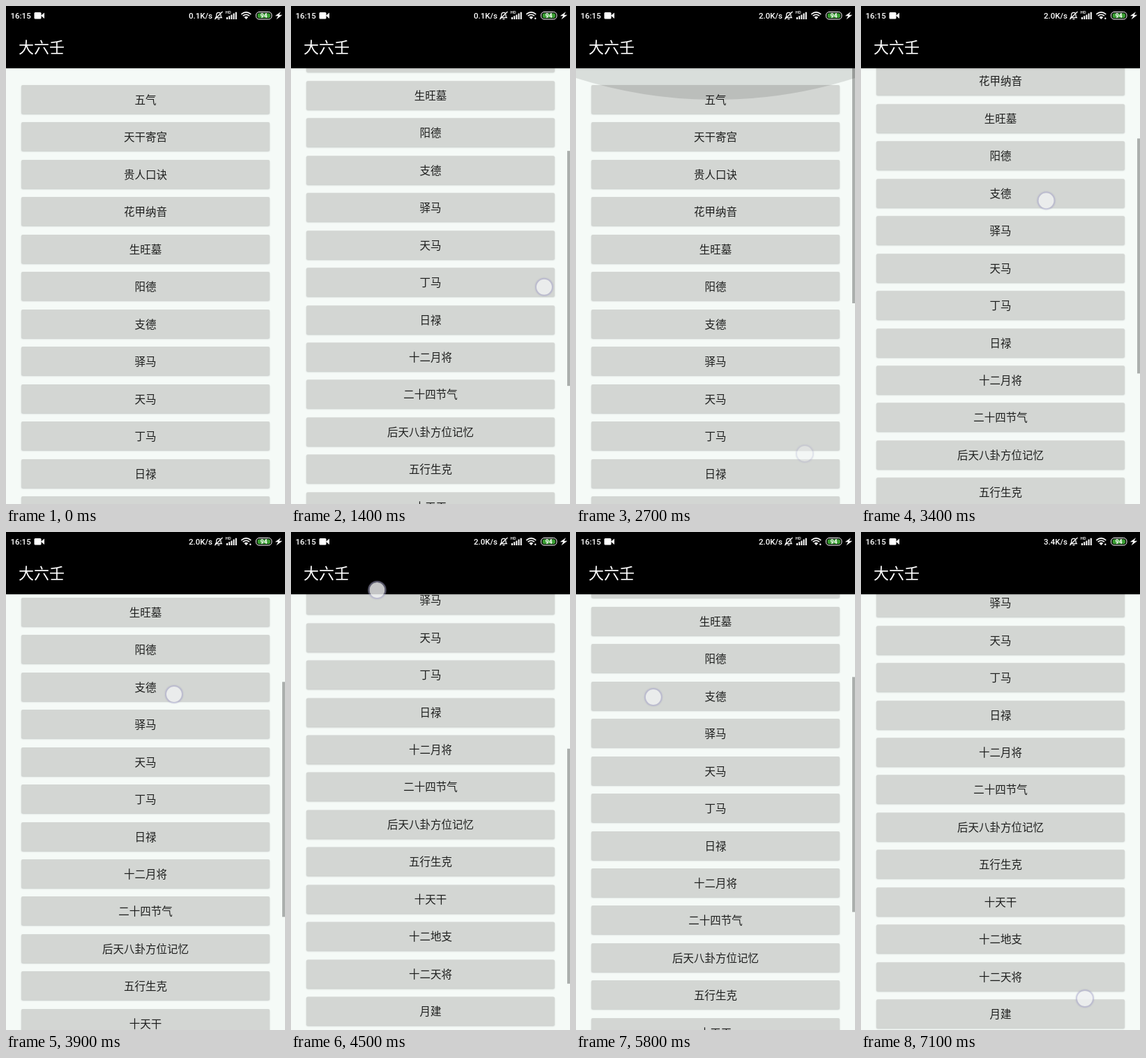
An HTML page for the animation above (7200 ms loop, 400 by 712 pixels).

```html
<!DOCTYPE html>
<html lang="zh-CN">
<head>
<meta charset="utf-8">
<style>
  html, body { margin: 0; width: 100%; height: 100%; overflow: hidden; background: #f5faf7; }
  #stage { position: relative; width: 400px; height: 712px; overflow: hidden; background: #f5faf7;
    font-family: "Noto Sans CJK SC", "Noto Sans CJK", sans-serif; }
  header { position: absolute; left: 0; top: 0; width: 400px; height: 89px; background: #000;
    box-shadow: 0 1px 2px rgba(0,0,0,.15); }
  header svg { position: absolute; left: 0; top: 0; }
  h1 { position: absolute; left: 18px; top: 41px; margin: 0; color: #fff; font: inherit;
    font-size: 22px; line-height: 32px; }
  #view { position: absolute; left: 0; top: 89px; width: 400px; height: 623px; overflow: hidden; }
  #list { position: absolute; left: 0; top: 0; width: 400px; }
  .item { position: absolute; left: 22px; width: 356px; height: 41px; border-radius: 2px;
    background: #d3d6d3; box-shadow: 0 1px 2px rgba(0,0,0,.2); color: #1e1f1e;
    font-size: 15.5px; line-height: 40px; text-align: center; }
  .glow { position: absolute; left: 0; width: 400px; height: 45px; }
  #glowTop { top: 0; transform-origin: 0 0; }
  #glowEnd { bottom: 0; transform-origin: 0 100%; }
  #bar { position: absolute; right: 0; top: 0; width: 4.5px; height: 335.5px; background: rgba(0,0,0,.3); }
  #touch { position: absolute; left: -13px; top: -13px; width: 22px; height: 22px; border-radius: 50%;
    border: 2px solid rgba(170,168,205,.55); background: rgba(240,241,242,.82);
    background-clip: padding-box; box-shadow: 0 0 2px rgba(150,150,170,.4); }
</style>
</head>
<body>
<div id="stage">
  <div id="view">
    <div id="list"></div>
    <svg class="glow" id="glowTop"><path d="M0 0H400V14A660 660 0 0 1 0 14Z" fill-opacity=".115"/></svg>
    <svg class="glow" id="glowEnd"><path d="M0 45H400V31A660 660 0 0 0 0 31Z" fill-opacity=".115"/></svg>
    <div id="bar"></div>
  </div>
  <header>
    <svg width="400" height="30" fill="#fff" font-family="Roboto, sans-serif" font-size="11.5" font-weight="500">
      <text x="6.5" y="17.5">16:15</text>
      <rect x="40.5" y="9" width="10" height="9.5" rx="1.5"/>
      <path d="M50 13.7L55 9.5V18Z"/>
      <text id="speed" x="296" y="17.5" text-anchor="end">0.1K/s</text>
      <path d="M300.5 16.7H309.3L308 14.8V12.2A3.2 3.4 0 0 0 301.7 12.2V14.8ZM303.5 18.7H306.3M299.3 19L310.5 8"
        fill="none" stroke="#fff" stroke-width="1.2"/>
      <text x="314.5" y="11.3" font-size="6">HD</text>
      <path d="M317 19V16M320.2 19V14.3M323.4 19V12.5M326.6 19V10.6M329.8 19V8.7" stroke="#fff" stroke-width="2"/>
      <path d="M337.3 11.8Q344.3 6 351.3 11.8M339.6 14.2Q344.3 10.3 349 14.2"
        fill="none" stroke="#fff" stroke-width="1.5"/>
      <path d="M341.4 16Q344.3 13.6 347.2 16L344.3 19Z"/>
      <circle id="dot" cx="350.3" cy="17.7" r="1.2"/>
      <rect x="358.5" y="8.5" width="22.5" height="10.5" rx="4.5" fill="none" stroke="#fff"/>
      <rect x="360.5" y="10.3" width="18.5" height="7" rx="2.8" fill="#3a9f33"/>
      <text x="369.7" y="16.8" font-size="8.5" font-weight="700" text-anchor="middle">94</text>
      <path d="M394 8.3L385.8 14.3H390.2L387.6 19.2L396.2 12.8H391.6Z"/>
    </svg>
    <h1>大六壬</h1>
  </header>
  <div id="touch"></div>
</div>
<script>
const LOOP = 7200, STEP = 100, PITCH = 53.45, BAR_RATIO = 0.5377, FADE = 220;
const labels = ('五气 天干寄宫 贵人口诀 花甲纳音 生旺墓 阳德 支德 驿马 天马 丁马 日禄 十二月将 ' +
  '二十四节气 后天八卦方位记忆 五行生克 十天干 十二地支 十二天将 月建 四课 三传').split(' ');

// Points where the list rests or turns: [ms, offset].
const turns = [[1150, 0], [1718, 535], [2180, 535], [2550, 0], [3050, 0], [3733, 360], [4150, 0],
  [4572, 445], [5050, 40], [5610, 408], [5970, 61], [6230, 406.7]];

// While a finger drags, its height plus the list offset (grip) stays constant.
const drags = [
  { start: 1200, end: 1500, from: 349, to: 363.5, grip: 621.5 },
  { start: 2200, end: 2590, from: 328, to: 328, grip: 640 },
  { start: 3100, end: 4150, from: 310, to: 240, grip: 465 },
  { start: 4150, end: 5050, from: 240, to: 89, grip: 493.5 },
  { start: 5050, end: 6230, from: 89, to: 112, grip: 456 },
  { start: 7050, end: LOOP, from: 321, to: 321, grip: 1073.7 }
];

const clamp = u => Math.min(1, Math.max(0, u));
const mix = (a, b, u) => a + (b - a) * u;
const smooth = u => u * u * (3 - 2 * u);
const easeOut = u => 1 - (1 - u) ** 3;
const pulse = (t, peak, reach) => smooth(clamp(1 - Math.abs(t - peak) / reach));

function offsetAt(t) {
  const next = turns.findIndex(([ms]) => ms > t);
  if (next < 0) return turns.at(-1)[1];
  if (next === 0) return turns[0][1];
  const [t0, a] = turns[next - 1], [t1, b] = turns[next];
  return mix(a, b, smooth((t - t0) / (t1 - t0)));
}

const el = id => document.getElementById(id);
const list = el('list'), bar = el('bar'), touch = el('touch'), speed = el('speed'), dot = el('dot');
const glowTop = el('glowTop'), glowEnd = el('glowEnd');

labels.forEach((label, i) => {
  const item = document.createElement('div');
  item.className = 'item';
  item.textContent = label;
  item.style.top = 24 + i * PITCH + 'px';
  list.append(item);
});

function drawTouch(t, offset) {
  const drag = drags.findLast(d => d.start <= t);
  touch.style.opacity = drag ? clamp(1 - (t - drag.end) / FADE) : 0;
  if (!drag) return;
  const x = mix(drag.from, drag.to, easeOut(clamp((t - drag.start) / (drag.end - drag.start))));
  touch.style.transform = `translate(${x}px, ${drag.grip - offset}px)`;
}

function draw(t) {
  const offset = offsetAt(t);
  list.style.transform = `translateY(${-offset}px)`;
  bar.style.transform = `translateY(${offset * BAR_RATIO}px)`;
  bar.style.opacity = t < 1200 ? 0 : clamp((6880 - t) / 250);
  glowTop.style.transform = `scaleY(${pulse(t, 2700, 200) + pulse(t, 4180, 150) / 2})`;
  glowEnd.style.transform = `scaleY(${pulse(t, 1820, 240) * .7})`;
  speed.textContent = (t < 2400 ? '0.1' : t < 6700 ? '2.0' : '3.4') + 'K/s';
  dot.style.opacity = t >= 700 && t < 2400 || t >= 2900 ? 1 : 0;
  drawTouch(t, offset);
}

function tick() {
  const t = (performance.now() + 5) % LOOP;
  draw(Math.floor(t / STEP) * STEP);
  requestAnimationFrame(tick);
}
tick();
</script>
</body>
</html>
```
